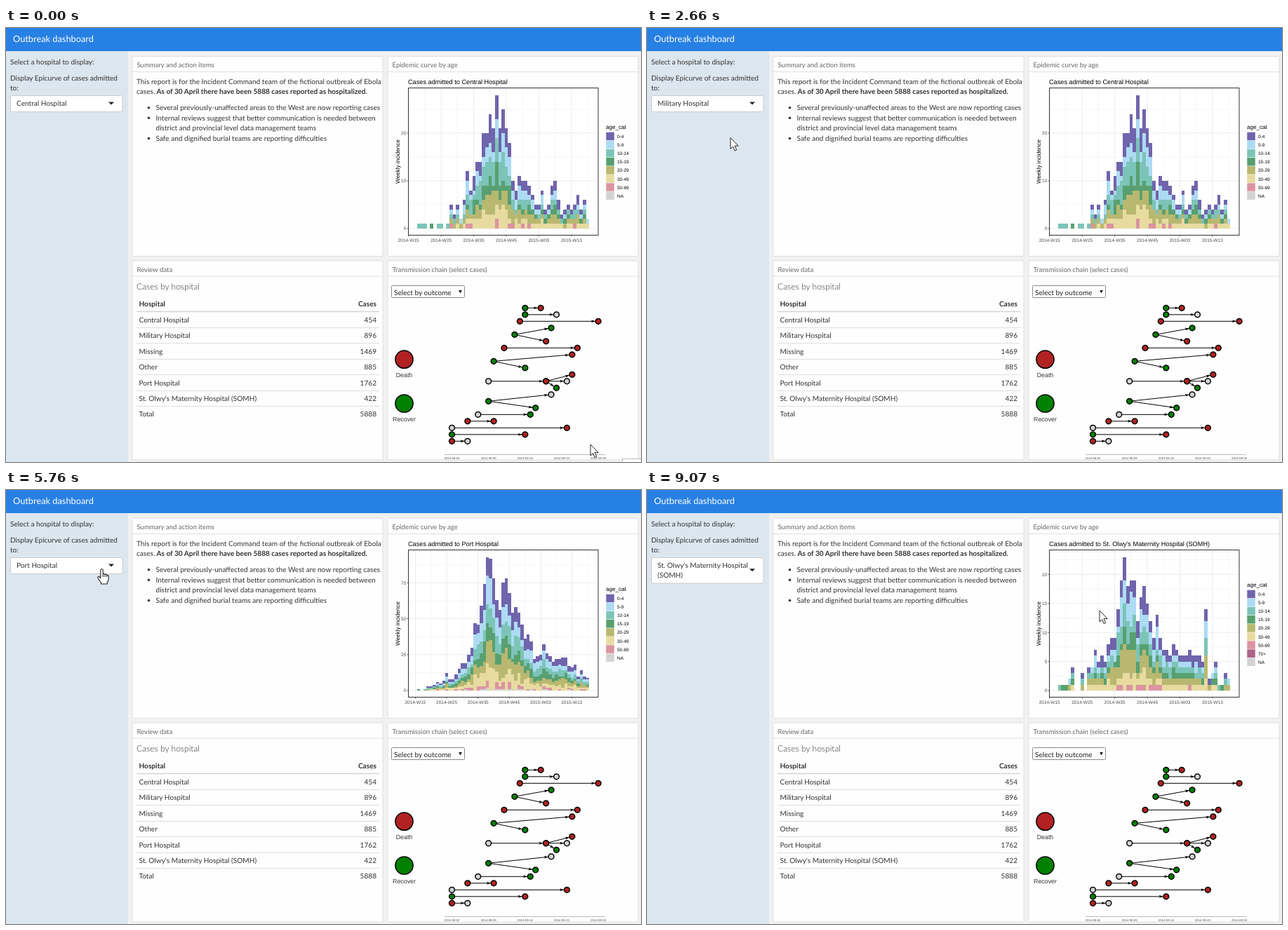
Animation of 905 by 619 pixels, one loop 9.45 s. Source, as an HTML page:

```html
<!DOCTYPE html>
<html lang="en">
<head>
<meta charset="utf-8">
<title>Outbreak dashboard</title>
<style>
html, body { margin: 0; width: 100%; height: 100%; overflow: hidden; background: #f1f1f1; }
svg { display: block; width: 905px; height: 619px; text-rendering: geometricPrecision;
  font: 10.1px Lato, "Open Sans", sans-serif; fill: #333; }
.plot { font-family: "Liberation Sans", Arial, sans-serif; font-size: 6.5px; fill: #4d4d4d; }
.crisp { shape-rendering: crispEdges; }
.menu { filter: drop-shadow(0 3px 3px rgba(0, 0, 0, .22)); }
</style>
</head>
<body>
<svg id="stage" viewBox="0 0 905 619" xmlns="http://www.w3.org/2000/svg"></svg>
<script>
const LOOP = 9450;
const MATERNITY = ["St. Olwy's Maternity Hospital", "(SOMH)"];

const attrs = o => Object.entries(o).map(([k, v]) => ` ${k}="${v}"`).join("");
const tag = (name, o, body = "") => `<${name}${attrs(o)}>${body}</${name}>`;
const rect = (x, y, width, height, fill, o = {}) => tag("rect", { x, y, width, height, fill, ...o });
const line = (x1, y1, x2, y2, stroke, w = 1) =>
  tag("line", { x1, y1, x2, y2, stroke, "stroke-width": w });
const text = (x, y, s, o = {}) => tag("text", { x, y, ...o }, s);
const path = (d, o = {}) => tag("path", { d, ...o });
const circle = (cx, cy, r, fill, o = {}) => tag("circle", { cx, cy, r, fill, ...o });
const BOLD = { "font-weight": 700 };
const END = { "text-anchor": "end" };
const MID = { "text-anchor": "middle" };

// ---- static page ----
function panel(x, y, h, title) {
  return rect(x + .5, y + .5, 357, h, "#fefefe", { stroke: "#e0e0e0", rx: 1 })
    + line(x, y + 22.5, x + 358, y + 22.5, "#e0e0e0")
    + text(x + 7, y + 16, title, { fill: "#666", "font-size": 9.55 });
}

function summary() {
  const items = ["Several previously-unaffected areas to the West are now reporting cases",
    "Internal reviews suggest that better communication is needed between",
    "district and provincial level data management teams",
    "Safe and dignified burial teams are reporting difficulties"];
  return text(186, 79.5, "This report is for the Incident Command team of the fictional outbreak of Ebola")
    + text(186, 94.2, "cases.")
    + text(214.5, 94.2, "As of 30 April there have been 5888 cases reported as hospitalized.", BOLD)
    + items.map((s, i) => text(213.5, 117 + i * 14.6, s)
      + (i === 2 ? "" : circle(203.5, 113.7 + i * 14.6, 1.8, "#333"))).join("");
}

function table() {
  const rows = [["Central Hospital", 454], ["Military Hospital", 896], ["Missing", 1469],
    ["Other", 885], ["Port Hospital", 1762], [MATERNITY.join(" "), 422], ["Total", 5888]];
  return text(186, 373, "Cases by hospital", { "font-size": 12.1, "font-weight": 300 })
    + text(189.5, 397, "Hospital", BOLD) + text(528, 397, "Cases", { ...BOLD, ...END })
    + line(186, 404.5, 532, 404.5, "#d4d4d4", 1.4)
    + rows.map(([name, n], i) => {
      const y = 420 + i * 22.4;
      return text(189.5, y, name) + text(528, y, n, END)
        + (i < 6 ? line(186, Math.round(y + 7) + .5, 532, Math.round(y + 7) + .5, "#dedede") : "");
    }).join("");
}

// ---- transmission chain: node = [day, row, outcome], link = [from, to] ----
const OUTCOME = { D: "#b22222", R: "#008000", U: "#d3d3d3" };
const trees = ["14,0,R 17,0,D", "14,1,R 20,1,U", "13,2,D 28,2,D", "12,4,R 19,3,R 18,5,D",
  "10,6,D 24,6,D", "8,8,R 23,7,D 14,9,R", "7,11,U 18,11,D", "18,11,D 23,10,D 22,11,U 20,12,R",
  "7,14,R 19,13,U 16,15,R", "5,16,U 15,16,R", "3,17,D 8,17,D", "0,18,U 22,18,D",
  "0,19,R 14,19,D", "0,20,D 3,20,U"];

function chain() {
  let links = "", nodes = "";
  const place = s => {
    const [d, r, o] = s.split(",");
    return { x: 635.5 + d * 7.45, y: 399.3 + r * 9.5, o };
  };
  for (const tree of trees) {
    const [root, ...kids] = tree.split(" ").map(place);
    for (const k of kids) {
      const dx = k.x - root.x, dy = k.y - root.y, len = Math.hypot(dx, dy);
      const angle = Math.atan2(dy, dx) * 180 / Math.PI;
      links += line(root.x, root.y, k.x, k.y, "#000", 1)
        + path(`M${len - 4.5} 0l-5.5 -2l1.2 2l-1.2 2z`,
          { fill: "#000", transform: `translate(${root.x} ${root.y}) rotate(${angle})` });
    }
    for (const n of [root, ...kids])
      nodes += circle(n.x, n.y, 3.9, OUTCOME[n.o], { stroke: "#000", "stroke-width": 1.5 });
  }
  const legend = [["Death", "D", 472.7], ["Recover", "R", 535.5]].map(([s, o, y]) =>
    circle(567.5, y, 12.6, OUTCOME[o], { stroke: "#000", "stroke-width": 1.5 })
    + text(567.5, y + 25.5, s, { ...MID, fill: "#343434", "font-size": 8.85 })).join("");
  const dates = ["02", "09", "16", "23", "30"].map((d, i) =>
    text(635.5 + i * 52.15, 615, "2014-08-" + d, { ...MID, "font-size": 4.3 })).join("");
  return rect(549.5, 367.5, 104, 17, "#fff", { stroke: "#8a8a8a", rx: 1 })
    + text(553, 380.5, "Select by outcome", { fill: "#222" })
    + path("M645 374h5l-2.5 4.5z", { fill: "#222" })
    + links + nodes
    + tag("g", { class: "plot" }, legend + line(625, 608.5, 854, 608.5, "#aaa", .8) + dates);
}

// ---- epidemic curves ----
const ages = ["0-4", "5-9", "10-14", "15-19", "20-29", "30-49", "50-69", "70+", "NA"];
const tints = [[51, 34, 136], [136, 204, 238], [68, 170, 153], [17, 119, 51], [153, 153, 51],
  [221, 204, 119], [204, 102, 119], [136, 34, 85]]
  .map(c => `rgb(${c.map(v => Math.round(v * .7 + 76.5))})`).concat("#d3d3d3");
// share of each bar lying below the given age group
const below = [.81, .63, .46, .33, .17, .03, .014, .008, 0];

const curves = [
  { name: "Central Hospital", tick: 573.7, gap: 46.45, step: 10, seed: 5, elders: false,
    weeks: [1, 1, 1, 0, 1, 0, 1, 1, 0, 1, 5, 3, 5, 2, 6, 12, 8, 11, 14, 14, 20, 20, 24, 21, 28, 21,
      25, 21, 18, 10, 8, 11, 10, 10, 9, 7, 5, 5, 8, 4, 5, 9, 10, 6, 3, 4, 5, 4, 5, 7, 4, 6, 2] },
  { name: "Military Hospital", tick: 587.3, gap: 44, step: 10, seed: 11, elders: true,
    weeks: [1, 0, 0, 0, 5, 4, 2, 2, 2, 4, 2, 3, 4, 4, 11, 11, 21, 10, 23, 16, 25, 31, 27, 50, 35, 34,
      40, 33, 36, 39, 38, 28, 20, 30, 24, 32, 13, 13, 17, 22, 25, 16, 14, 12, 9, 17, 14, 11, 10, 5,
      7, 5, 6, 3, 6, 2] },
  { name: "Port Hospital", tick: 583.5, gap: 44.6, step: 25, seed: 23, elders: false,
    weeks: [1, 0, 1, 3, 3, 4, 6, 5, 7, 12, 8, 8, 11, 15, 19, 19, 25, 30, 47, 46, 59, 74, 93, 92, 78,
      63, 56, 75, 78, 68, 54, 58, 54, 46, 36, 39, 34, 22, 24, 25, 32, 26, 24, 20, 22, 22, 23, 23,
      17, 16, 18, 10, 14, 10, 9] },
  { name: MATERNITY.join(" "), tick: 573.7, gap: 46.45, step: 5, seed: 31, elders: true,
    weeks: [1, 1, 1, 2, 4, 0, 0, 3, 0, 4, 4, 7, 5, 6, 5, 8, 9, 9, 14, 19, 23, 18, 19, 19, 12, 16, 18,
      15, 12, 9, 13, 9, 7, 7, 6, 8, 7, 6, 6, 6, 7, 6, 6, 6, 5, 14, 2, 3, 5, 1, 1, 3, 2] }
];

function curve({ name, tick, gap, step, seed, elders, weeks }, id) {
  const L = 573.5, R = 844, T = 85.5, B = 295.5, BASE = 286;
  const max = Math.max(...weeks), unit = 190.5 / max, w = 245.5 / weeks.length;
  const keys = ages.map((_, i) => i).filter(i => elders || i !== 7);
  let state = seed;
  const rand = () => (state = (state * 16807) % 2147483647) / 2147483647;
  for (let i = 0; i < 9; i++) rand();

  let grid = "", axes = "", bars = "";
  for (let i = 0; i < 6; i++) {
    const x = tick + i * gap;
    if (x > L + 1) grid += line(x, T, x, B, "#e8e8e8", .8);
    grid += line(x + gap / 2, T, x + gap / 2, B, "#f0f0f0", .6);
    axes += line(x, B, x, B + 2, "#333", .8)
      + text(x, 304.5, ["2014-W15", "2014-W25", "2014-W35", "2014-W45", "2015-W03", "2015-W13"][i], MID);
  }
  for (let v = 0; v <= max * 1.05; v += step) {
    const y = BASE - v * unit, half = y - step * unit / 2;
    grid += line(L, y, R, y, "#e8e8e8", .8);
    if (half > T) grid += line(L, half, R, half, "#f0f0f0", .6);
    axes += line(L - 2, y, L, y, "#333", .8) + text(L - 3.2, y + 2.4, v, END);
  }
  weeks.forEach((n, i) => {
    let hi = n;
    for (const k of keys) {
      const share = below[k] + (rand() - .5) * (.12 + .3 / (n + 1)) * (k < 6 ? 1 : .25);
      const lo = k === 8 ? 0 : Math.max(0, Math.min(hi, Math.round(n * share)));
      if (hi > lo) bars += rect(585.8 + i * w, BASE - hi * unit, w, (hi - lo) * unit, tints[k]);
      hi = lo;
    }
  });
  const top = elders ? 142.4 : 148.4;
  const legend = text(855, top - 4.5, "age_cat", { fill: "#000", "font-size": 8.1 })
    + keys.map((k, i) => rect(855.3, top + i * 12.1 + .3, 11.5, 11.5, tints[k])
      + text(871, top + i * 12.1 + 8.6, ages[k], { fill: "#000" })).join("");
  return tag("g", { class: "plot", id: "curve" + id },
    rect(L, T, R - L, B - T, "#fff") + grid + tag("g", { class: "crisp" }, bars)
    + rect(L, T, R - L, B - T, "none", { stroke: "#333", "stroke-width": 1 })
    + axes + legend
    + text(573, 80.2, "Cases admitted to " + name, { fill: "#000", "font-size": 9.19 })
    + text(0, 0, "Weekly incidence",
      { ...MID, fill: "#000", "font-size": 8.1, transform: "translate(560.5 190.5) rotate(-90)" }));
}

// ---- hospital picker: [label lines, top, bottom] ----
const options = [[["Central Hospital"], 125, 143], [["Military Hospital"], 143, 161],
  [["Port Hospital"], 161, 180], [MATERNITY, 180, 212], [["Missing"], 212, 230], [["Other"], 230, 248]];
const lines = (list, x, y) => list.map((s, i) => text(x, y + i * 14, s)).join("");

function picker(value, open, caret, hover) {
  const list = options[value][0], h = list.length > 1 ? 36.5 : 23;
  const mid = 96.5 + h / 2 - 1;
  let out = rect(6.5, 96.5, 159.5, h, "#fff", { rx: 2.5, stroke: open ? "#5b9fdf" : "#ccc" });
  if (open) out = rect(5.5, 95.5, 161.5, h + 2, "none", { rx: 3.5, stroke: "#b5d3f0" }) + out;
  out += lines(list, 15, 111)
    + path(open ? `M146 ${mid + 2}h8l-4 -4z` : `M146 ${mid - 1.5}h8l-4 4z`, { fill: "#222" });
  if (caret) out += line(87.5, 101, 87.5, 114, "#222");
  if (!open) return out;
  return out + tag("g", { class: "menu" }, rect(7, 122, 159, 130, "#fff", { rx: 2 }))
    + rect(7, options[hover][1], 159, options[hover][2] - options[hover][1], "#f5f5f5")
    + options.map(([s, y]) => lines(s, 15, y + 12.6)).join("");
}

// ---- timeline ----
// move: [first step, last step, steps, x, y, bow]
const moves = [[70, 170, 2, 761, 550], [320, 940, 9, 140, 112], [1170, 1240, 2, 144, 108.5],
  [2120, 2420, 5, 119, 156.5], [3440, 3740, 5, 148, 109.5], [4060, 4450, 6, 103.5, 169],
  [5460, 5760, 5, 136.5, 112], [5850, 6000, 3, 147, 103], [6170, 6240, 2, 144, 97],
  [6410, 7020, 9, 112, 201.5], [8520, 9070, 8, 645, 172, 35]];
const menus = [[1730, 2580], [3910, 4760], [6170, 7180]];
const redraws = [3060, 5230, 7650];

function pointer(t) {
  let x = 833, y = 594;
  for (const [t0, t1, n, x1, y1, bow = 0] of moves) {
    if (t < t0) break;
    const k = Math.min(n, 1 + Math.floor((t - t0) * (n - 1) / (t1 - t0) + 1e-6)) / n;
    const p = k * k * (3 - 2 * k);
    x += (x1 - x) * p;
    y += (y1 - y) * p + bow * Math.sin(Math.PI * p);
  }
  return [x, y];
}

const ARROW = path("M0 0V16L3.7 12.6L6.2 18.6L8.7 17.5L6.2 11.6H11.2Z",
  { fill: "#fff", stroke: "#222", "stroke-width": 1 });
const HAND = path("M-1.7 1.8Q0 -.8 1.7 1.8V8Q3.4 6.6 4.6 8.6Q6.2 7.5 7.2 9.4Q9.6 9 9.6 11.5V15"
  + "Q9.6 18 7.8 19.8V22H-1V20Q-4 16.5 -5.6 13.2Q-6 10.8 -3.8 11.4L-1.7 13.6Z"
  + "M1.7 8V12M4.6 8.8V12M7.2 9.6V12",
  { fill: "#fff", stroke: "#222", "stroke-width": 1.1, "stroke-linejoin": "round" });

const stage = document.getElementById("stage");
stage.innerHTML = rect(0, 0, 905, 619, "#f1f1f1")
  + rect(0, 33, 174, 586, "#dce6ef") + rect(0, 0, 905, 33, "#2780e3")
  + text(10, 20.2, "Outbreak dashboard", { fill: "#fff", "font-size": 12.8 })
  + text(6, 52, "Select a hospital to display:")
  + text(6, 74.5, "Display Epicurve of cases admitted") + text(6, 89, "to:")
  + panel(179.5, 40, 285, "Summary and action items") + panel(543.5, 40, 285, "Epidemic curve by age")
  + panel(179.5, 331.5, 284, "Review data") + panel(543.5, 331.5, 284, "Transmission chain (select cases)")
  + summary() + table() + chain() + curves.map(curve).join("")
  + tag("g", { id: "picker" }) + rect(878.5, 614.5, 30, 8, "#fff", { id: "popup", stroke: "#bbb" })
  + tag("g", { id: "arrow" }, ARROW) + tag("g", { id: "hand" }, HAND);

const el = id => document.getElementById(id);
const show = (id, on) => el(id).setAttribute("display", on ? "inline" : "none");
let lastPicker = "";

function draw(t) {
  const [x, y] = pointer(t);
  const value = menus.filter(m => t >= m[1]).length;
  const menu = menus.find(m => t >= m[0] && t < m[1]);
  const shown = redraws.filter(r => t >= r).length;
  curves.forEach((_, i) => show("curve" + i, i === shown));

  const under = options.findIndex(o => y >= o[1] && y < o[2]);
  const html = picker(value, !!menu, menu && value === 0 && t - menu[0] < 440, under < 0 ? value : under);
  if (html !== lastPicker) el("picker").innerHTML = lastPicker = html;

  const hand = x > 6 && x < 166 && y > 96 && y < (menu ? 252 : 119.5);
  show("hand", hand);
  show("arrow", !hand);
  el(hand ? "hand" : "arrow").setAttribute("transform", `translate(${x} ${y})`);
  show("popup", t < 70);
}

const start = performance.now();
function tick() {
  draw((performance.now() - start) % LOOP);
  requestAnimationFrame(tick);
}
tick();
</script>
</body>
</html>
```
